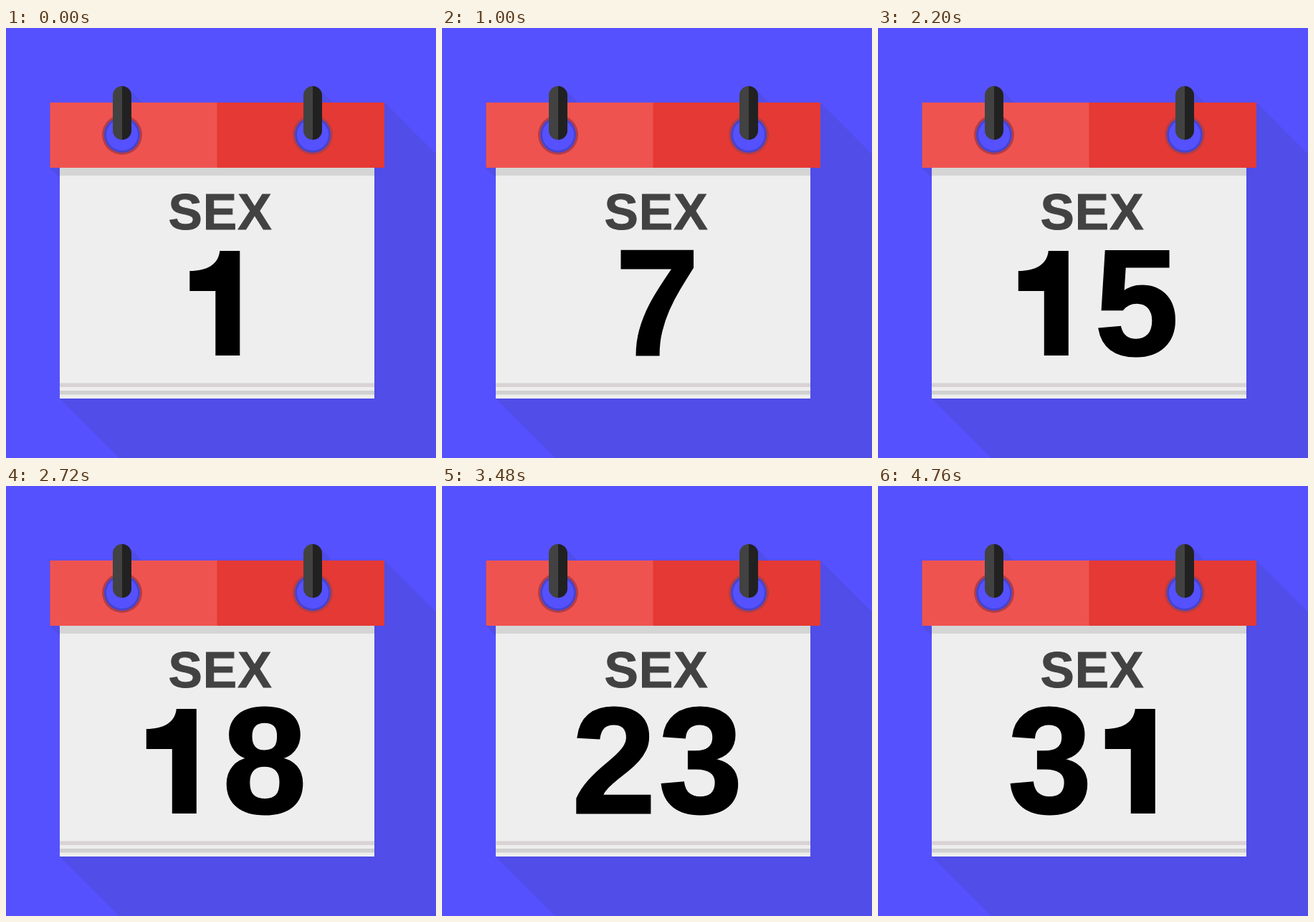
Write an HTML page that moves like this. It is 600 px wide and 600 px high and loops after 4.8 s.

```html
<!DOCTYPE html>
<html lang="en">
<head>
<meta charset="utf-8">
<title>Calendar</title>
<style>
  html, body { margin: 0; width: 100%; height: 100%; overflow: hidden; background: #5551ff; }
  svg { display: block; width: 100vw; height: 100vh; }
  text { font-family: "Liberation Sans", Arial, sans-serif; font-weight: bold; text-anchor: middle; }
  .month { font-size: 71px; letter-spacing: 1px; fill: #424242; stroke: #424242; }
  .digit { font-size: 210px; stroke: #000; stroke-width: 3px; }
</style>
</head>
<body>
<svg viewBox="0 0 600 600">
  <defs>
    <g id="ring">
      <circle cy="149" r="28" fill="#b53d45"/>
      <circle cy="149" r="25" fill="#4743cd"/>
      <circle cy="149" r="22" fill="#5551ff"/>
      <path d="M-13 94A13 13 0 0 1 0 81V156A13 13 0 0 1 -13 143Z" fill="#424242"/>
      <path d="M0 81A13 13 0 0 1 13 94V143A13 13 0 0 1 0 156Z" fill="#212121"/>
    </g>
    <!-- A "1" without a foot, centred on x = 0 -->
    <path id="one" d="M26 311V457H-8V367H-44V339C-20 339 -4 330 -2 311Z"/>
  </defs>
  <g id="calendar">
    <path fill="#504de8" d="M528 104L1128 704V1117H675L75 517V209L61 195V104H162L153 85L171 85L190 104H428L437 85L456 104Z"/>
    <path fill="#5551ff" d="M153 85L162 104H143ZM437 85L428 104H418Z"/>
    <path fill="#eee" d="M75 195H514V517H75Z"/>
    <path fill="#d5d5d5" d="M75 195H514V206H75Z"/>
    <path fill="#dad3d5" d="M75 495.5H514V501H75Z"/>
    <path fill="#d0d0d0" d="M75 506H514V511.5H75Z"/>
    <path fill="#ef5350" d="M61.5 104H295V195H61.5Z"/>
    <path fill="#e53935" d="M294.5 104H528V195H294.5Z"/>
    <use href="#ring" x="162"/>
    <use href="#ring" x="428"/>
    <text class="month" x="299" y="281">SEX</text>
    <g id="day"></g>
  </g>
</svg>
<script>
  const LOOP = 4800, DAY = 160, BEAT = 40, PITCH = 121;
  const calendar = document.getElementById("calendar");
  const dayGroup = document.getElementById("day");
  let shownDay = 0;

  function showDay(day) {
    if (day === shownDay) return;
    shownDay = day;
    const digits = [...String(day)];
    dayGroup.innerHTML = digits.map((digit, i) => {
      const x = 300.3 + (i - (digits.length - 1) / 2) * PITCH;
      return digit === "1"
        ? `<use href="#one" x="${x}"/>`
        : `<text class="digit" x="${x}" y="455.5">${digit}</text>`;
    }).join("");
  }

  // Each new day arrives with one short beat at 105 %.
  function render(now) {
    const t = now % LOOP + DAY / 2;
    showDay(Math.floor(t / DAY) + 1);
    const scale = t % DAY < BEAT ? 1.05 : 1;
    calendar.setAttribute("transform",
      `translate(294.8 170) scale(${scale}) translate(-294.8 -170)`);
  }

  const start = performance.now();
  function tick() {
    render(performance.now() - start);
    requestAnimationFrame(tick);
  }
  tick();
</script>
</body>
</html>
```
